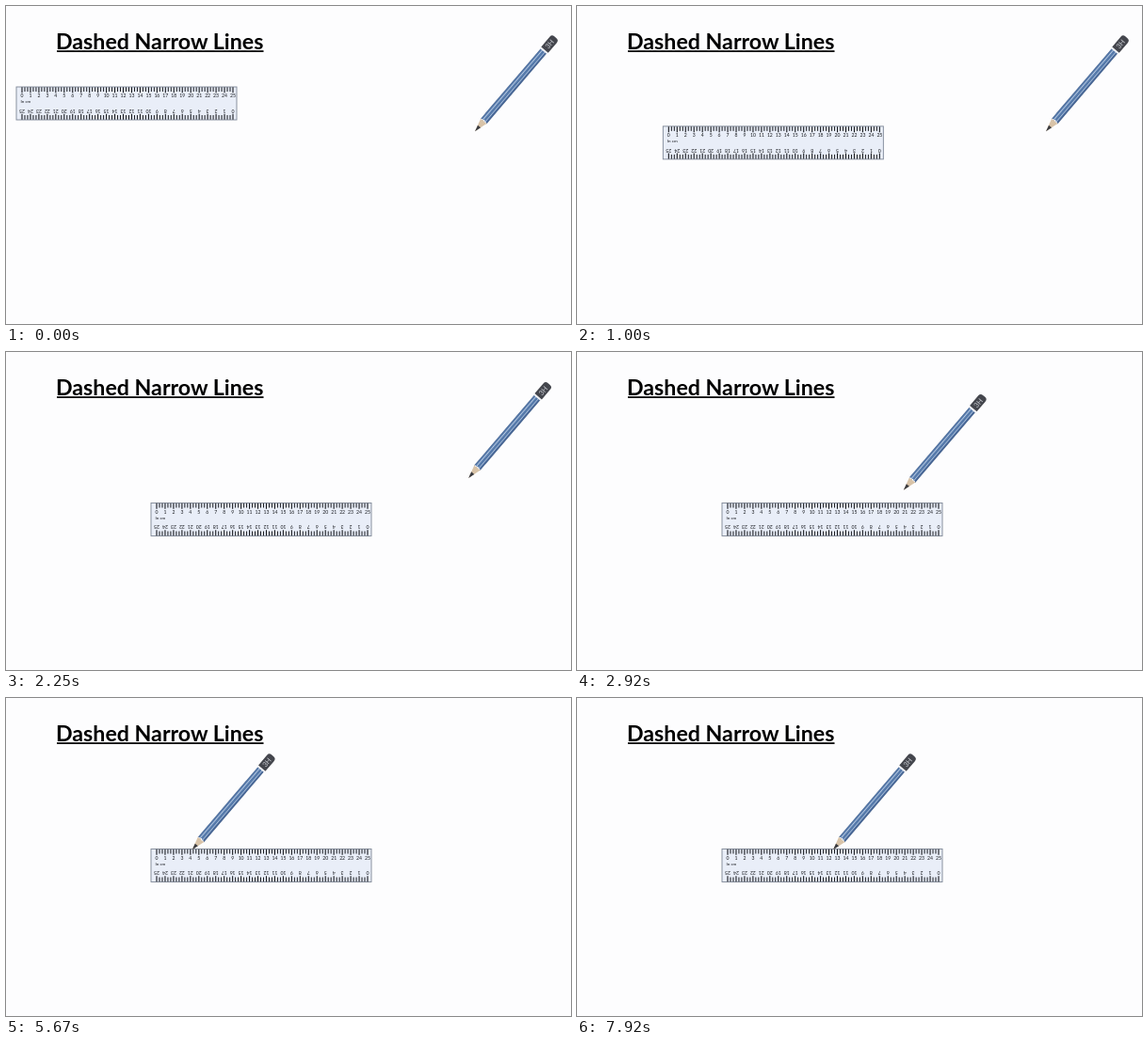
These frames come from a looping animation (600 px wide and 338 px high, 8 s). An HTML page:

```html
<!DOCTYPE html>
<html lang="en">
<head>
<meta charset="utf-8">
<title>Dashed Narrow Lines</title>
<style>
  html, body { margin: 0; width: 100%; height: 100%; overflow: hidden; background: #fdfdfe; }
  svg { display: block; width: 100vw; height: 100vh; }
  .title { font: bold 23.2px Lato, sans-serif; fill: #000; }
  .scale text { font: 5.1px Lato, sans-serif; fill: #15171c; text-anchor: middle; }
  .scale path { stroke: #15171c; fill: none; }
  .unit { font: 4.5px Lato, sans-serif; fill: #15171c; }
  .grade { font: 7.5px Lato, sans-serif; fill: #c9ccd2; text-anchor: middle; }
</style>
</head>
<body>
<svg viewBox="0 0 600 338">
  <defs>
    <linearGradient id="paint" x1="0" y1="0" x2="0" y2="1">
      <stop offset="0" stop-color="#4c6a96"/>
      <stop offset=".2" stop-color="#5b7fb0"/>
      <stop offset=".3" stop-color="#b9cbe2"/>
      <stop offset=".4" stop-color="#5b7fb0"/>
      <stop offset=".6" stop-color="#5276a6"/>
      <stop offset=".7" stop-color="#a9bfdb"/>
      <stop offset=".8" stop-color="#4c6d9e"/>
      <stop offset="1" stop-color="#435f8a"/>
    </linearGradient>
  </defs>

  <text class="title" x="53" y="45.8">Dashed Narrow Lines</text>
  <rect x="54" y="47.2" width="219.5" height="1.8"/>

  <g id="ruler">
    <rect width="234" height="35" fill="#e9eef8" stroke="#7d8696" stroke-width=".9"/>
    <g class="scale"></g>
    <g class="scale" transform="translate(236 35) rotate(180)"></g>
    <text class="unit" x="4.5" y="17">In cm</text>
  </g>

  <g id="pencil">
    <g transform="rotate(-49.5)">
      <path d="M0 0 15 -4.3 Q13 -2.5 15 -1 Q13 1 15 4.3Z" fill="#d8c3a8"/>
      <path d="M0 0 7 -2 7 2Z" fill="#3a3b40"/>
      <path d="M14 -4.2 H113 V4.2 H14 Q16 3 14.5 1.5 Q17 0 14.5 -1.5 Q16 -3 14 -4.2Z" fill="url(#paint)"/>
      <rect x="112" y="-4.6" width="2" height="9.2" fill="#f0f1f4"/>
      <path d="M114 -4.9 H128 Q131.5 -4.9 131.5 -1.5 V1.5 Q131.5 4.9 128 4.9 H114Z" fill="#44464d"/>
      <text class="grade" x="122" y="2.7">3H</text>
    </g>
  </g>
</svg>
<script>
  const LOOP = 8000, STEP = 1000 / 12, CM = 8.96, TICKS_PER_CM = 3, GLIDE = 1720;
  const ruler = document.getElementById('ruler');
  const pencil = document.getElementById('pencil');

  function scaleMarkup() {
    let ticks = '', major = '', labels = '';
    for (let i = 0; i <= 25 * TICKS_PER_CM; i++) {
      const x = (6 + i * CM / TICKS_PER_CM).toFixed(2);
      if (i % TICKS_PER_CM) {
        ticks += `M${x} .3V5`;
      } else {
        major += `M${x} .3V6.3`;
        labels += `<text x="${x}" y="11.1">${i / TICKS_PER_CM}</text>`;
      }
    }
    return `<path d="${ticks}"/><path d="${major}" stroke-width="1.1"/>${labels}`;
  }
  document.querySelectorAll('.scale').forEach(g => { g.innerHTML = scaleMarkup(); });

  const clamp = v => Math.min(1, Math.max(0, v));
  const easeInOut = u => u < .5 ? 2 * u * u : 1 - 2 * (1 - u) ** 2;
  const glide = (t, start) => easeInOut(clamp((t - start) / GLIDE));
  const place = (el, x, y) =>
    el.setAttribute('transform', `translate(${x.toFixed(2)} ${y.toFixed(2)})`);

  function draw(t) {
    const r = glide(t, 85);
    place(ruler, 11 + 143 * r, 86 + 74.5 * r);

    // The pencil glides to the ruler, then accelerates along its edge.
    const p = glide(t, 2070);
    const along = (2.6 * Math.max(0, t - 4350) / 1000) ** 2;
    place(pencil, 498 - 312 * p + along, 133.3 + 28 * p);
  }

  const origin = performance.now();
  function tick() {
    const t = (performance.now() - origin) % LOOP;
    draw(Math.floor((t + 5) / STEP) * STEP);
    requestAnimationFrame(tick);
  }
  tick();
</script>
</body>
</html>
```
